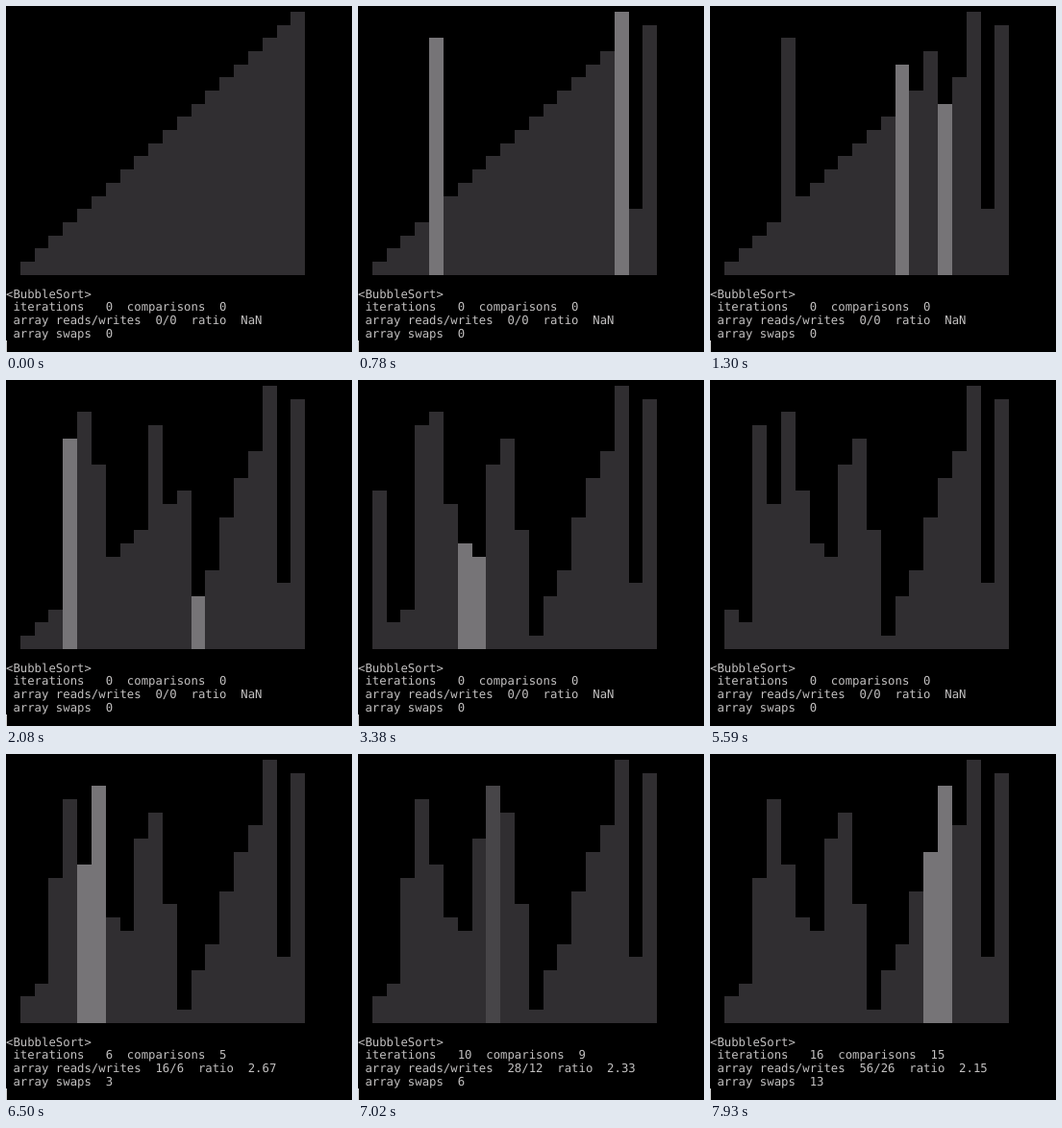
Recreate the animation shown at these times as an HTML page. Size 360 by 360 pixels, loop 8 s.

```html
<!DOCTYPE html>
<html lang="en">
<head>
<meta charset="utf-8">
<title>BubbleSort</title>
<style>
  html, body { margin: 0; width: 100%; height: 100%; overflow: hidden; background: #000; }
  svg { display: block; width: 360px; height: 360px; }
  rect { shape-rendering: crispEdges; }
  text {
    font: 12.31px "DejaVu Sans Mono", "Noto Sans Mono", monospace;
    fill: #c2c0c0;
    white-space: pre;
    text-rendering: geometricPrecision;
  }
</style>
</head>
<body>
<svg id="stage" viewBox="0 0 360 360"></svg>
<script>
const LOOP = 8000, TICK = 130, N = 20;
const SORT_START = 5980, PHASE = 70;
const CELL_W = 7.41, ROW_H = 13.68, TOP = 6;
const BAR = '#302e31', READ = '#474548', SWAP = '#767477';

// Swap partner for each index from N - 1 down to 1.
const PARTNERS = [18, 4, 4, 14, 12, 9, 5, 3, 0, 8, 3, 5, 6, 6, 0, 4, 0, 0, 1];

const stage = document.getElementById('stage');

function add(tag, attrs) {
  const el = document.createElementNS('http://www.w3.org/2000/svg', tag);
  for (const key in attrs) el.setAttribute(key, attrs[key]);
  return stage.appendChild(el);
}

const rowY = row => TOP + row * ROW_H;
const barX = i => Math.round((i + 1) * 2 * CELL_W);

const bars = Array.from({ length: N }, (_, i) =>
  add('rect', { x: barX(i), width: barX(i + 1) - barX(i) }));
const lines = [21, 22, 23, 24].map(row => add('text', { x: 0, y: rowY(row) + 10.3 }));
const cursor = add('rect', { x: 0, y: 348, width: 1, height: 12, fill: '#ccc' });

function buildSteps() {
  const a = Array.from({ length: N }, (_, i) => i + 1);
  const stats = { iterations: 0, comparisons: 0, reads: 0, writes: 0, swaps: 0 };
  const steps = [];
  const swap = (i, j) => { [a[i], a[j]] = [a[j], a[i]]; };
  const push = (t, marked = [], color = BAR) =>
    steps.push({ t, values: [...a], marked, color, stats: { ...stats } });

  push(0);
  PARTNERS.forEach((j, k) => {
    const i = N - 1 - k;
    swap(i, j);
    push((k + 1) * 260 + (i < 3 ? TICK : 0), [i, j], SWAP);
  });
  push(5330);

  let t = SORT_START;
  stats.iterations = 1;
  for (let j = 0; t < LOOP; j++) {
    stats.iterations++;
    stats.comparisons++;
    push(t, [j], READ);
    t += PHASE;
    stats.reads += 2;
    if (a[j] > a[j + 1]) {
      swap(j, j + 1);
      stats.reads += 2;
      stats.writes += 2;
      stats.swaps++;
      push(t, [j, j + 1], SWAP);
      t += PHASE;
    }
  }
  return steps;
}

const steps = buildSteps();
let shown = null;

function draw({ values, marked, color, stats: s }) {
  values.forEach((v, i) => {
    const y = Math.round(rowY(N - v));
    bars[i].setAttribute('y', y);
    bars[i].setAttribute('height', 280 - y);
    bars[i].setAttribute('fill', marked.includes(i) ? color : BAR);
  });
  const ratio = (s.reads / s.writes).toFixed(2);
  [
    '<BubbleSort>',
    ` iterations   ${s.iterations}  comparisons  ${s.comparisons}`,
    ` array reads/writes  ${s.reads}/${s.writes}  ratio  ${ratio}`,
    ` array swaps  ${s.swaps}`
  ].forEach((line, i) => { lines[i].textContent = line; });
}

function render(now) {
  const t = Math.floor((now % LOOP) / TICK) * TICK;
  const step = steps.findLast(s => s.t <= t);
  if (step !== shown) draw(shown = step);
  cursor.style.visibility = t >= 5590 && t < SORT_START ? 'hidden' : 'visible';
}

let start = null;
function frame(now) {
  start ??= now;
  render(now - start);
  requestAnimationFrame(frame);
}
render(0);
requestAnimationFrame(frame);
</script>
</body>
</html>
```
